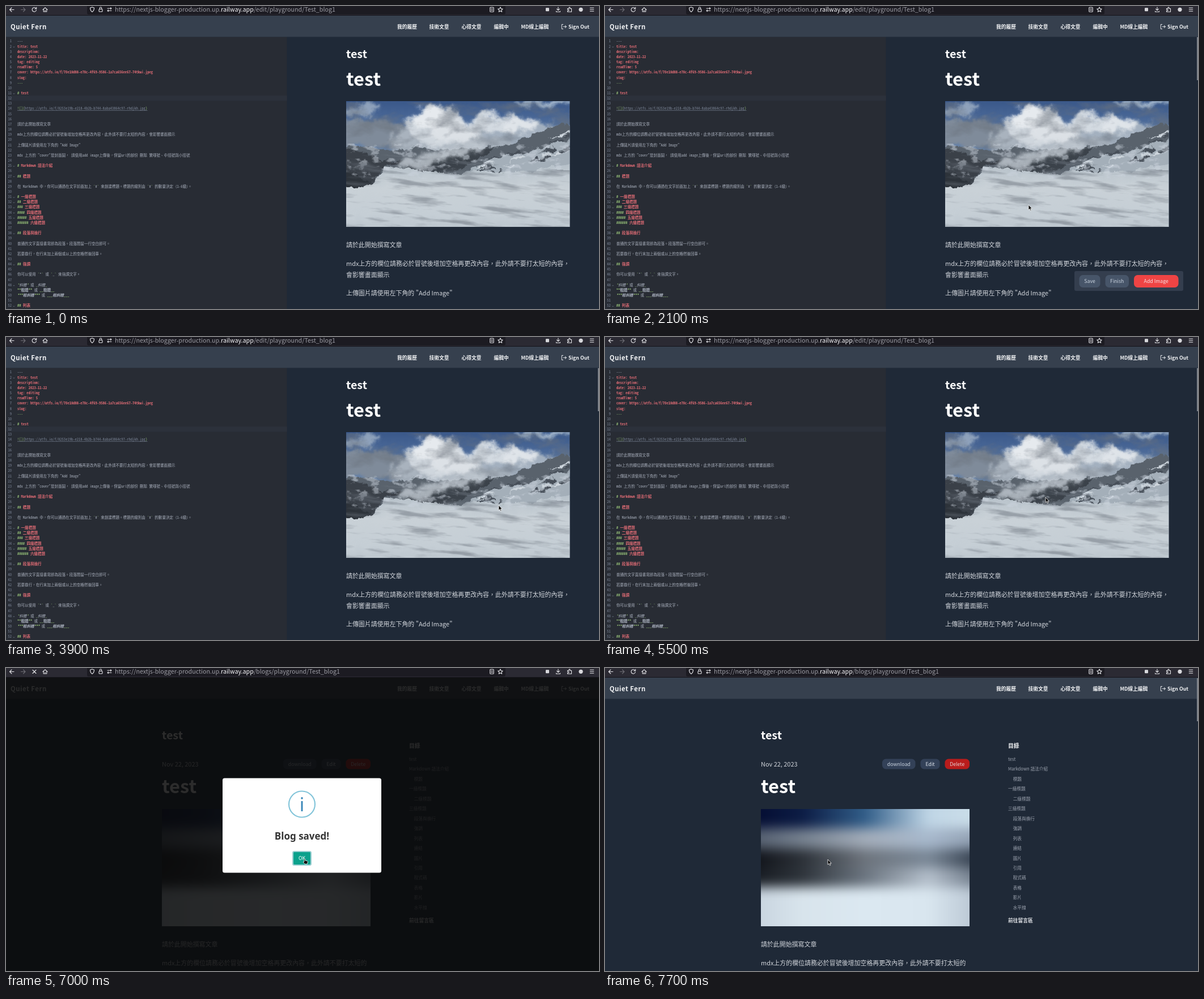
Write an HTML page that moves like this. It is 1046 px wide and 535 px high and loops after 8000 ms.

```html
<!DOCTYPE html>
<html lang="zh-Hant">
<head>
<meta charset="utf-8">
<title>Blog editor</title>
<style>
html, body { margin: 0; width: 100%; height: 100%; overflow: hidden; background: #1f2937; }
svg { display: block; }
text { font-family: "Noto Sans CJK TC", "Noto Sans CJK JP", "Noto Sans", sans-serif; white-space: pre; }
.code text { font-family: "Noto Sans Mono CJK TC", "Noto Sans Mono CJK JP", "Noto Sans Mono", monospace; font-size: 6.56px; }
.icons path, .icons rect { fill: none; stroke: #e6e6ea; stroke-width: 1.1; stroke-linecap: round; stroke-linejoin: round; }
.h { fill: #e06c75; font-weight: 700; }
.m { fill: #98c379; }
.u { fill: #7d8799; }
.b { font-weight: 700; }
.i { font-style: italic; }
</style>
</head>
<body>
<script>
const NS = 'http://www.w3.org/2000/svg';
const LOOP = 8000;

function el(parent, name, attrs = {}, text) {
  const node = document.createElementNS(NS, name);
  for (const key in attrs) node.setAttribute(key, attrs[key]);
  if (text !== undefined) node.textContent = text;
  parent.appendChild(node);
  return node;
}
const group = (parent, attrs) => el(parent, 'g', attrs);
const rect = (parent, x, y, width, height, fill, rx = 0) =>
  el(parent, 'rect', { x, y, width, height, fill, rx });
const path = (parent, d, attrs) => el(parent, 'path', { d, ...attrs });
// Text placed by the middle of its line.
const label = (parent, x, mid, size, str, fill, attrs) =>
  el(parent, 'text', { x, y: mid + size * 0.37, 'font-size': size, fill, ...attrs }, str);
const bold = { 'font-weight': 700 };
const centred = { 'text-anchor': 'middle' };

function seeded(seed) {
  return () => (seed = (seed * 16807) % 2147483647) / 2147483647;
}

const stage = el(document.body, 'svg', { viewBox: '0 0 1046 535', width: '100%', height: '100%' });
const defs = el(stage, 'defs');

function filter(id, ...steps) {
  const f = el(defs, 'filter', { id, x: '-20%', y: '-20%', width: '140%', height: '140%', 'color-interpolation-filters': 'sRGB' });
  for (const [name, attrs] of steps) el(f, name, attrs);
}
const noise = (baseFrequency, seed) =>
  ['feTurbulence', { type: 'fractalNoise', baseFrequency, numOctaves: 5, seed, result: 'noise' }];
const smooth = stdDeviation => ['feGaussianBlur', { in: 'SourceGraphic', stdDeviation }];
const ripple = scale =>
  ['feDisplacementMap', { in2: 'noise', scale, xChannelSelector: 'R', yChannelSelector: 'G' }];
// Turns noise into patches of one grey whose opacity follows the noise.
const patches = (grey, gain, cut) =>
  ['feColorMatrix', { values: `0 0 0 0 ${grey} 0 0 0 0 ${grey + 0.03} 0 0 0 0 ${grey + 0.07} ${gain} 0 0 0 ${cut}` }];

filter('cloud', noise(0.035, 7), smooth(3), ripple(34));
filter('rough', noise(0.06, 3), smooth(0.5), ripple(16));
filter('haze', noise(0.04, 5), smooth(4), ripple(24));
filter('shade', noise('0.02 0.035', 11), patches(0.42, 3.2, -1.5));
filter('rock', noise('0.05 0.09', 4), patches(0.8, 7, -3.9));
filter('drift', noise('0.012 0.09', 9), patches(0.42, 4, -2));
filter('wide', smooth(10));

function gradient(id, colours, vertical) {
  const g = el(defs, 'linearGradient', { id, x2: vertical ? 0 : 1, y2: vertical ? 1 : 0 });
  colours.forEach((c, i) => el(g, 'stop', { offset: i / (colours.length - 1), 'stop-color': c }));
  return `url(#${id})`;
}

function buildPhoto(parent) {
  const p = el(parent, 'svg', { x: 600, y: 168, width: 394.5, height: 222, viewBox: '0 0 394 222', preserveAspectRatio: 'none' });
  const rnd = seeded(41);
  const layer = (name, opacity = 1) => group(p, { filter: `url(#${name})`, opacity });
  const puff = (g, cx, cy, rx, ry, fill) => el(g, 'ellipse', { cx, cy, rx, ry, fill });

  rect(p, 0, 0, 394, 222, gradient('sky', ['#3a588a', '#5f7ea8', '#8596ab', '#8596ab'], true));
  const clouds = layer('cloud');
  puff(clouds, 25, 16, 40, 9, '#8fa2bb');
  puff(clouds, 25, 56, 85, 24, '#7f8b9a');
  puff(clouds, 205, 74, 130, 36, '#a9b3be');
  puff(clouds, 325, 58, 85, 22, '#a3b0bf');
  puff(clouds, 350, 4, 55, 6, '#9fb3ca');
  puff(clouds, 160, 44, 52, 34, '#cfd6dd');
  puff(clouds, 150, 30, 34, 18, '#e6eaee');
  puff(clouds, 195, 52, 42, 18, '#dce1e6');
  puff(clouds, 262, 40, 48, 16, '#d3dae1');
  puff(clouds, 305, 44, 36, 11, '#dfe4e9');
  rect(layer('shade', 0.55), 0, 20, 394, 90);

  const land = layer('rough');
  path(land, 'M-20 82L30 78 70 88 125 82 200 88 262 80 300 70 330 58 348 52 374 40 388 46 414 40V240H-20Z', { fill: '#59626c' });
  path(land, 'M-20 84L30 90 64 104 104 106 60 118 44 148 -20 156Z', { fill: '#3a4048' });
  path(land, 'M150 96L200 84 262 82 222 108 180 128 96 122Z', { fill: '#3b424a' });
  path(land, 'M205 126L268 100 340 84 414 62V240H130Z', { fill: '#a4afb9' });
  for (let i = 0; i < 26; i++) {
    const x = 225 + rnd() * 165, y = 108 - (x - 215) * 0.3 + rnd() * 38, w = 10 + rnd() * 20;
    path(land, `M${x} ${y}l${w} ${-w * 0.45} ${w * 0.3} 4Z`, { fill: i % 3 ? '#474f59' : '#cdd5dc' });
  }
  path(land, 'M-20 156L44 148 66 116 120 120 180 129 240 122 310 128 414 104V250H-20Z',
    { fill: gradient('snow', ['#b3bec7', '#c9d1d7', '#c5ced5', '#b3bdc6'], true) });
  path(land, 'M-20 126L20 130 44 148 14 152 -20 156Z', { fill: '#2d333a' });
  rect(layer('rock', 0.5), 0, 84, 394, 44);

  const mist = layer('haze', 0.85);
  for (let i = 0; i < 10; i++) puff(mist, 112 + i * 13, 108 - i * 4 + rnd() * 8, 17, 9, '#bfc7cf');
  const drift = layer('drift', 0.5);
  drift.setAttribute('transform', 'rotate(5 197 170)');
  rect(drift, 0, 128, 400, 110);
}

function buildPlaceholder(parent) {
  const p = el(parent, 'svg', { x: 275, y: 249, width: 368, height: 207 });
  const bands = group(p, { filter: 'url(#wide)' });
  const tones = [
    [-40, ['#02082c', '#0c1c44', '#315d88', '#c0d6e6', '#cfe0ea']],
    [34, ['#4a5566', '#76818f', '#a3adba', '#a8b9cd', '#8a98aa']],
    [70, ['#07090f', '#2b3037', '#6d747d', '#7a8897', '#1b2534']],
    [104, ['#10141a', '#2e343b', '#6b7580', '#b5c0cc', '#5a6675']],
    [138, ['#c2ceda', '#d8e4ec', '#dbe8f1', '#d9e6ef', '#aebbc9']],
  ];
  tones.forEach(([y, colours], i) => {
    const end = i < 4 ? tones[i + 1][0] : 250;
    rect(bands, -40, y, 448, end - y, gradient('band' + i, colours));
  });
}

const source = {
  1: '---', 2: 'title: test', 3: 'description:', 4: 'date: 2023-11-22', 5: 'tag: editing', 6: 'readTime: 5',
  7: 'cover: https://utfs.io/f/70e18d88-e78c-4f69-9586-1a7ca656ee67-74tkwi.jpeg', 8: 'slug:', 9: '---',
  11: '# test', 14: '![](https://utfs.io/f/8253e19b-e218-4b2b-b744-8aba43864c97-rhdjkh.jpg)',
  17: '請於此開始撰寫文章',
  19: 'mdx上方的欄位請務必於冒號後增加空格再更改內容，此外請不要打太短的內容，會影響畫面顯示',
  21: '上傳圖片請使用左下角的 "Add Image"',
  23: 'mdx 上方的 "cover"是封面圖， 請使用add image上傳後，保留url的部份 刪除 驚嘆號、中括號與小括號',
  25: '# Markdown 語法介紹', 27: '## 標題',
  29: '在 Markdown 中，你可以通過在文字前面加上 `#` 來創建標題。標題的級別由 `#` 的數量決定（1-6級）。',
  31: '# 一級標題', 32: '## 二級標題', 33: '### 三級標題', 34: '#### 四級標題', 35: '##### 五級標題', 36: '###### 六級標題',
  38: '## 段落與換行', 40: '普通的文字直接書寫即為段落。段落間留一行空白即可。',
  42: '若要換行，在行末加上兩個或以上的空格然後回車。', 44: '## 強調',
  46: '你可以使用 `*` 或 `_` 來強調文字。',
  48: '*斜體* 或 _斜體_', 49: '**粗體** 或 __粗體__', 50: '***粗斜體*** 或 ___粗斜體___', 52: '## 列表',
};

// Splits one line into [text, classes] pieces.
function highlight(n, line) {
  if (n > 1 && n < 9) return [[line, 'h']];
  if (n === 9) return [[line, 'm']];
  if (n === 14) return [['![](', 'm'], [line.slice(4, -1), 'u'], [')', 'm']];
  const head = line.match(/^(#+)( .*)/);
  if (head) return [[head[1], 'm b'], [head[2], 'h']];
  if (n < 48) return line.split(/(`)/).map(s => [s, s === '`' ? 'm' : '']);
  return line.split(/([*_]+[^*_]+[*_]+)/).flatMap(s => {
    const mark = s.match(/^([*_]+)(.+?)[*_]+$/);
    if (!mark) return [[s, '']];
    const style = ['i', 'b', 'b i'][mark[1].length - 1];
    return [[mark[1], 'm ' + style], [mark[2], style], [mark[1], 'm ' + style]];
  });
}

function buildEditor(parent) {
  const g = group(parent, { class: 'code' });
  rect(g, 0, 54.5, 495.5, 481, '#282c34');
  rect(g, 0, 158.2, 495.5, 9, '#2c313b');
  const folds = [2, 11, 25, 27, 31, 32, 33, 34, 35, 38, 44, 48, 52];
  for (let n = 1; n <= 52; n++) {
    const y = 62 + (n - 1) * 9.157;
    label(g, 10, y, 6.56, n, '#7d8799', { 'text-anchor': 'end' });
    if (folds.includes(n)) path(g, `M12.6 ${y + 0.6}l1.3 1.3 1.3-1.3`, { fill: 'none', stroke: '#7d8799', 'stroke-width': 0.7 });
    if (!source[n]) continue;
    const row = label(g, 20, y, 6.56, undefined, '#abb2bf');
    for (const [s, cls] of highlight(n, source[n])) el(row, 'tspan', { class: cls }, s);
    if (n === 14) rect(g, 20, y + 3.2, 229.5, 0.6, '#7d8799');
  }
}

function heading(g, x, small, big) {
  label(g, x, small - 0.6, 19.7, 'test', '#fff', bold);
  label(g, x, big, 32.6, 'test', '#fff', { 'font-weight': 900 });
}
const prose = (g, x, y, str) => label(g, x, y, 10.94, str, '#d1d5db');

function button(parent, x, y, w, h, str, fill, colour = '#cbd5e1') {
  const box = rect(parent, x, y, w, h, fill, 6.5);
  label(parent, x + w / 2, y + h / 2, 8.75, str, colour, centred);
  return box;
}

// Browser bar
rect(stage, 0, 0, 1046, 535, '#1f2937');
const bar = group(stage);
rect(bar, 0, 0, 1046, 17, '#2b2a33');
rect(bar, 0, 16, 1046, 1, '#15141a');
rect(bar, 143, -4, 738, 19, '#1c1b22', 3);
const icons = group(bar, { class: 'icons' });
path(icons, 'M14 6.5H7M10 3L6.5 6.5 10 10');
path(icons, 'M26.5 6.5H33.5M30.5 3L34 6.5 30.5 10', { opacity: 0.35 });
const reload = path(icons, 'M52.5 3.8A3.7 3.7 0 1 0 53.5 7M53.7 2.2V5H51');
const stop = path(icons, 'M47 3.5L53 9.5M53 3.5L47 9.5');
path(icons, 'M65 6.5L69 2.8 73 6.5M66.2 6V10H71.8V6M69 10V7.5');
path(icons, 'M152 2L155.5 3.3C155.5 7 154.5 9 152 10.5 149.5 9 148.5 7 148.5 3.3Z');
rect(icons, 164, 5.5, 6, 4.5, 'none', 1);
path(icons, 'M165.3 5.5V3.7A1.7 1.7 0 0 1 168.7 3.7V5.5');
path(icons, 'M179 4.3H186M179 8.3H186M184.5 2.9L186 4.3 184.5 5.7M180.5 6.9L179 8.3 180.5 9.7');
rect(icons, 853.8, 2.3, 6.4, 8, 'none', 1);
path(icons, 'M855.5 5H858.5M855.5 7.5H858.5');
path(icons, 'M872 2L873.3 4.9 876.3 5.2 874 7.3 874.7 10.3 872 8.7 869.3 10.3 870 7.3 867.7 5.2 870.7 4.9Z');
rect(bar, 952, 3.2, 6, 6, '#d8d8dc', 1);
path(icons, 'M974 2V7.5M971.5 5.2L974 7.7 976.5 5.2M970.5 9V10.3H977.5V9');
path(icons, 'M990.5 4.5H993V3A1 1 0 0 1 995 3V4.5H997.5V10.3H990.5V8.3H992A1 1 0 0 0 992 6.3H990.5Z');
el(bar, 'circle', { cx: 1014, cy: 6.3, r: 3.6, fill: '#d8d8dc' });
path(icons, 'M1030.3 3.3H1036.7M1030.3 6.3H1036.7M1030.3 9.3H1036.7');
const url = label(bar, 192, 6, 10.72, undefined, '#9c9ca4');
el(url, 'tspan', {}, 'https://nextjs-blogger-production.up.');
el(url, 'tspan', { fill: '#fbfbfe' }, 'railway.app');
const urlPath = el(url, 'tspan');

// Editor page
const editPage = group(stage);
buildEditor(editPage);
heading(editPage, 600, 85, 128.5);
buildPhoto(editPage);
prose(editPage, 600, 422, '請於此開始撰寫文章');
prose(editPage, 600, 455, 'mdx上方的欄位請務必於冒號後增加空格再更改內容，此外請不要打太短的內容，');
prose(editPage, 600, 474.5, '會影響畫面顯示');
prose(editPage, 600, 507, '上傳圖片請使用左下角的 "Add Image"');
const panel = group(editPage);
rect(panel, 828, 468, 192, 35, '#343e4e', 3);
const save = button(panel, 836.5, 475, 37, 22, 'Save', '#475569');
const finish = button(panel, 882.5, 475, 41.5, 22, 'Finish', '#475569');
button(panel, 933, 475, 78.5, 22, 'Add Image', '#ef4444', '#f3e4e6');

// Blog page
const blogPage = group(stage);
heading(blogPage, 275, 119.5, 209);
prose(blogPage, 275, 170, 'Nov 22, 2023');
button(blogPage, 489, 160.5, 58.5, 18, 'download', '#334158');
button(blogPage, 556.5, 160.5, 34, 18, 'Edit', '#334158', '#e2e8f0');
button(blogPage, 599.5, 160.5, 43.5, 18, 'Delete', '#b91c1c', '#e5d5d8');
buildPlaceholder(blogPage);
prose(blogPage, 275, 488, '請於此開始撰寫文章');
prose(blogPage, 275, 521, 'mdx上方的欄位請務必於冒號後增加空格再更改內容，此外請不要打太短的');
label(blogPage, 711, 137, 9.8, '目錄', '#f3f4f6', bold);
// A leading dash marks an indented entry.
'test,Markdown 語法介紹,-標題,一級標題,-二級標題,三級標題,-段落與換行,-強調,-列表,-連結,-圖片,-引用,-程式碼,-表格,-影片,-水平線'
  .split(',').forEach((s, i) =>
    label(blogPage, s[0] === '-' ? 719.7 : 711, 161 + i * 17.47, 7.66, s.replace('-', ''), '#9ca3af'));
label(blogPage, 711, 446, 8.75, '前往留言區', '#e5e7eb', bold);

// Navigation
rect(stage, 0, 17, 1046, 37.5, '#36404e');
label(stage, 8, 37, 11.4, 'Quiet Fern', '#f3f4f6', { ...bold, 'letter-spacing': 0.5 });
[[690, '我的履歷'], [746.5, '技術文章'], [803.5, '心得文章'], [860.5, '編輯中'], [908.5, 'MD線上編輯'], [992, 'Sign Out']]
  .forEach(([x, s]) => label(stage, x, 36.5, 8.75, s, '#f3f4f6', bold));
path(stage, 'M983 32.5H980.3V40.5H983M983 36.5H988.3M986 34L988.5 36.5 986 39', { fill: 'none', stroke: '#e5e7eb', 'stroke-width': 1 });
const scrollbar = rect(stage, 1044, 55, 2, 76, '#7f848c');

// Dialog
const dim = rect(stage, 0, 17, 1046, 518, '#0a0a0a');
const dialog = group(stage);
const plain = { ...centred, style: 'font-family:"Noto Sans",sans-serif' };
rect(dialog, 382, 194.5, 280, 167, '#fff', 3.5);
const info = group(dialog);
el(info, 'circle', { cx: 522, cy: 240.5, r: 23, fill: 'none', stroke: '#82c4d9', 'stroke-width': 2.1 });
label(info, 522, 240.3, 33, 'i', '#3a87b8', plain);
label(dialog, 522, 296.8, 17, 'Blog saved!', '#363636', { ...plain, ...bold });
const ok = rect(dialog, 506, 324, 32, 24, '#00d1b2', 2.5);
ok.setAttribute('stroke', '#9ccfd2');
ok.setAttribute('stroke-width', 2.2);
label(dialog, 522, 335.7, 8.75, 'OK', '#fff', { ...centred, 'font-weight': 500 });

// Pointer
const pointer = group(stage, { fill: '#000', stroke: '#fff', 'stroke-width': 0.8, 'stroke-linejoin': 'round' });
const arrow = path(pointer, 'M0 0V9.2L2.1 7.3 3.5 10.5 5 9.8 3.6 6.8H6.3Z');
const hand = path(pointer, 'M0 0Q1.5-1 1.8 .5V3L5.5 3.8Q6.5 4.2 6.2 5.5L5.5 9H.8L-1.7 5.6Q-1.5 4.4 0 5.2Z');

// Each move: first step, last step, target x and y.
const moves = [
  [300, 700, 936, 516], [900, 1300, 853, 485], [1500, 2100, 747, 351], [3900, 3900, 869, 297],
  [4000, 4100, 893, 423], [4300, 4700, 905, 483], [5000, 5000, 908, 477], [5200, 5200, 877, 386],
  [5400, 5500, 777, 283], [6300, 6300, 640, 250], [6500, 6500, 581, 228], [6700, 6700, 526, 337],
  [7200, 7200, 500, 337], [7700, 7700, 393, 338],
];
function pointerAt(t) {
  let x = 560, y = 350;
  for (const [from, to, tx, ty] of moves) {
    if (t < from) break;
    const k = Math.min(1, (t - from + 100) / (to - from + 100));
    x += (tx - x) * k;
    y += (ty - y) * k;
  }
  return [x, y];
}

// Each row: time, backdrop opacity, dialog scale, icon height.
const dialogSteps = [
  [0, 0, 1, 0], [2600, 0.77, 0.907, 0.04], [3900, 0, 1, 0],
  [6000, 0.6, 0.88, 0.04], [6100, 0.86, 1.02, 0.3], [6300, 0.86, 1, 1], [7200, 0, 1, 1],
];

const show = (node, on) => node.style.display = on ? '' : 'none';
const within = (t, ...spans) => spans.some(([a, b]) => t >= a && t < b);
const about = (x, y, sx, sy) => `translate(${x} ${y}) scale(${sx} ${sy}) translate(${-x} ${-y})`;

function draw(time) {
  const t = Math.floor((time % LOOP) / 100) * 100;
  const [, shade, scale, flip] = dialogSteps.findLast(s => t >= s[0]);
  const [x, y] = pointerAt(t);
  const onSave = within(t, [1200, 1600]), onFinish = within(t, [4600, 5200]), onOk = within(t, [6700, 7200]);
  const blog = t >= 6500;

  show(editPage, !blog);
  show(blogPage, blog);
  show(panel, within(t, [300, 3900], [4100, 5400]));
  show(scrollbar, within(t, [300, 6500], [7700, LOOP]));
  scrollbar.setAttribute('y', blog ? 18 : 55);
  save.setAttribute('fill', onSave ? '#5b6a80' : '#475569');
  finish.setAttribute('fill', onFinish ? '#5b6a80' : '#475569');

  const loading = within(t, [6300, 7200]);
  show(reload, !loading);
  show(stop, loading);
  urlPath.textContent = `/${t >= 6300 ? 'blogs' : 'edit'}/playground/Test_blog1`;

  dim.setAttribute('opacity', shade);
  show(dialog, shade > 0);
  dialog.setAttribute('transform', about(522, 278, scale, scale));
  info.setAttribute('transform', about(522, 240.5, 1, flip));
  info.setAttribute('opacity', flip < 0.1 ? 0.12 : 1);
  ok.setAttribute('fill', onOk ? '#0ba18c' : '#00d1b2');

  const pressing = onSave || onFinish || onOk;
  show(pointer, t >= 300);
  show(arrow, !pressing);
  show(hand, pressing);
  pointer.setAttribute('transform', `translate(${x} ${y})`);
}

const start = performance.now();
let last = -1;
function tick() {
  const now = performance.now() - start;
  const step = Math.floor(now / 100);
  if (step !== last) draw(now);
  last = step;
  requestAnimationFrame(tick);
}
tick();
</script>
</body>
</html>
```
